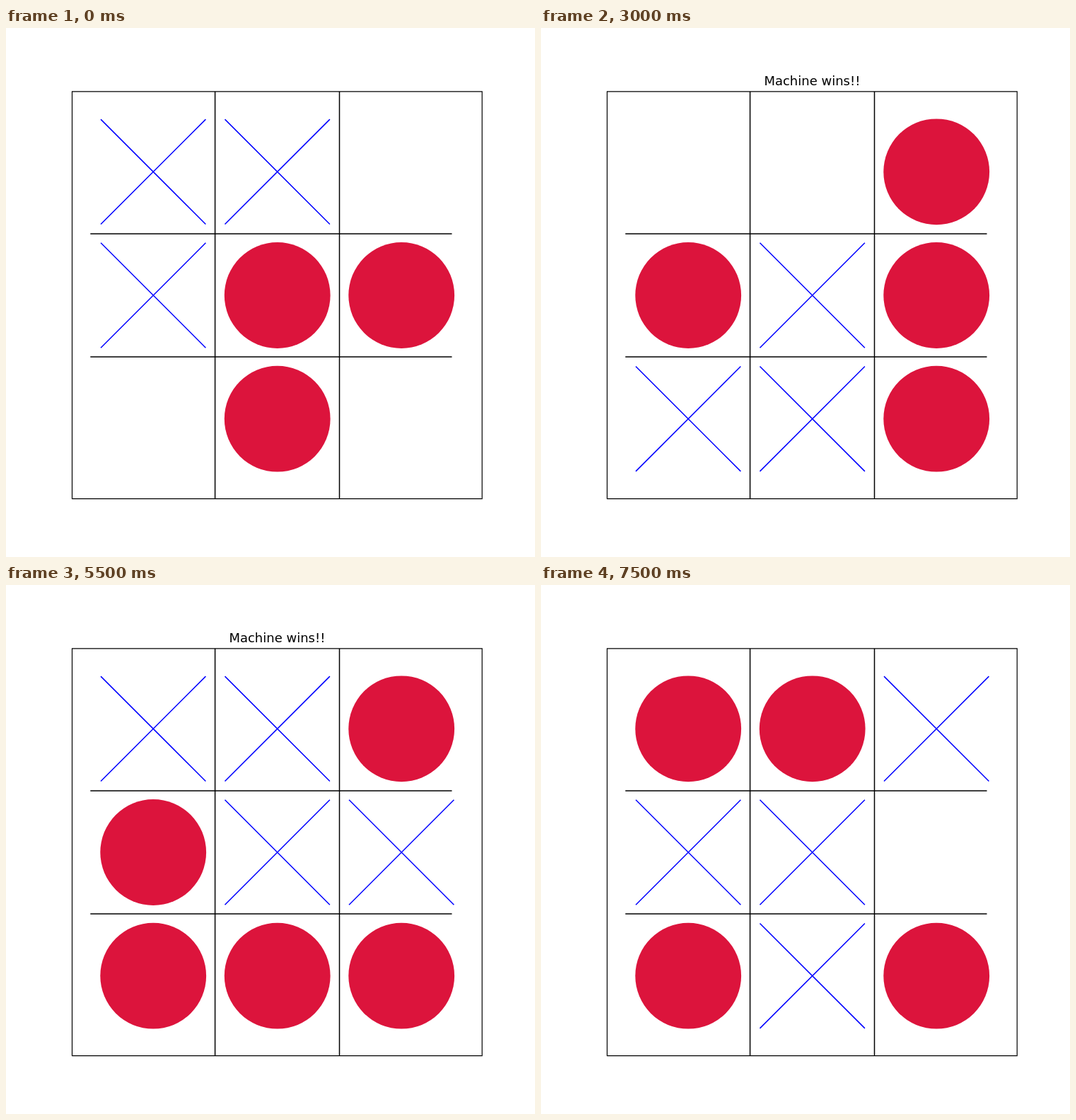
An HTML page for the animation above (8000 ms loop, 748 by 748 pixels).

```html
<!DOCTYPE html>
<html lang="en">
<head>
<meta charset="utf-8">
<title>Tic-tac-toe</title>
<style>
  html, body { margin: 0; width: 100%; height: 100%; overflow: hidden; background: #fff; }
  svg { display: block; width: 748px; height: 748px; }
  text { font: 18px "DejaVu Sans", sans-serif; text-anchor: middle; }
  path { fill: none; stroke: #000; stroke-width: 1.5; }
  #marks path { stroke: #00f; }
  circle { fill: #dc143c; }
</style>
</head>
<body>
<svg viewBox="0 0 748 748">
  <path d="M93.5 89.9H673.2V665.6H93.5Z" style="stroke-width:1.2"/>
  <path d="M295.6 90V665.5M471.5 90V665.5M119.3 290.9H630.5M119.3 465H630.5"/>
  <g id="marks"></g>
  <text id="title" x="383.4" y="80.8">Machine wins!!</text>
</svg>
<script>
  const STEP = 500;
  // Cells in order of play; the machine (circle) always opens.
  const games = ["405173286", "5634278", "247065318", "04638712"];
  const marks = document.getElementById("marks");
  const title = document.getElementById("title");

  // Each step shows one more circle and cross, or a lone winning circle.
  const boards = games.flatMap((moves, game) => {
    const steps = [];
    for (let n = game ? 2 : 6; n < moves.length + 2; n += 2) steps.push(moves.slice(0, n));
    return steps;
  });

  function mark(cell, turn) {
    const x = 208.2 + 175.5 * (cell % 3);
    const y = 203.3 + 174.7 * Math.floor(cell / 3);
    return turn % 2
      ? `<path d="M${x - 74.2} ${y - 74.2}l148.4 148.4m0-148.4l-148.4 148.4"/>`
      : `<circle cx="${x}" cy="${y}" r="74.9"/>`;
  }

  let shown = -1;
  function draw(now) {
    const step = Math.floor(now / STEP) % boards.length;
    if (step !== shown) {
      shown = step;
      const board = boards[step];
      marks.innerHTML = [...board].map(mark).join("");
      title.style.visibility = board.length % 2 ? "visible" : "hidden";
    }
    requestAnimationFrame(draw);
  }
  draw(0);
</script>
</body>
</html>
```
